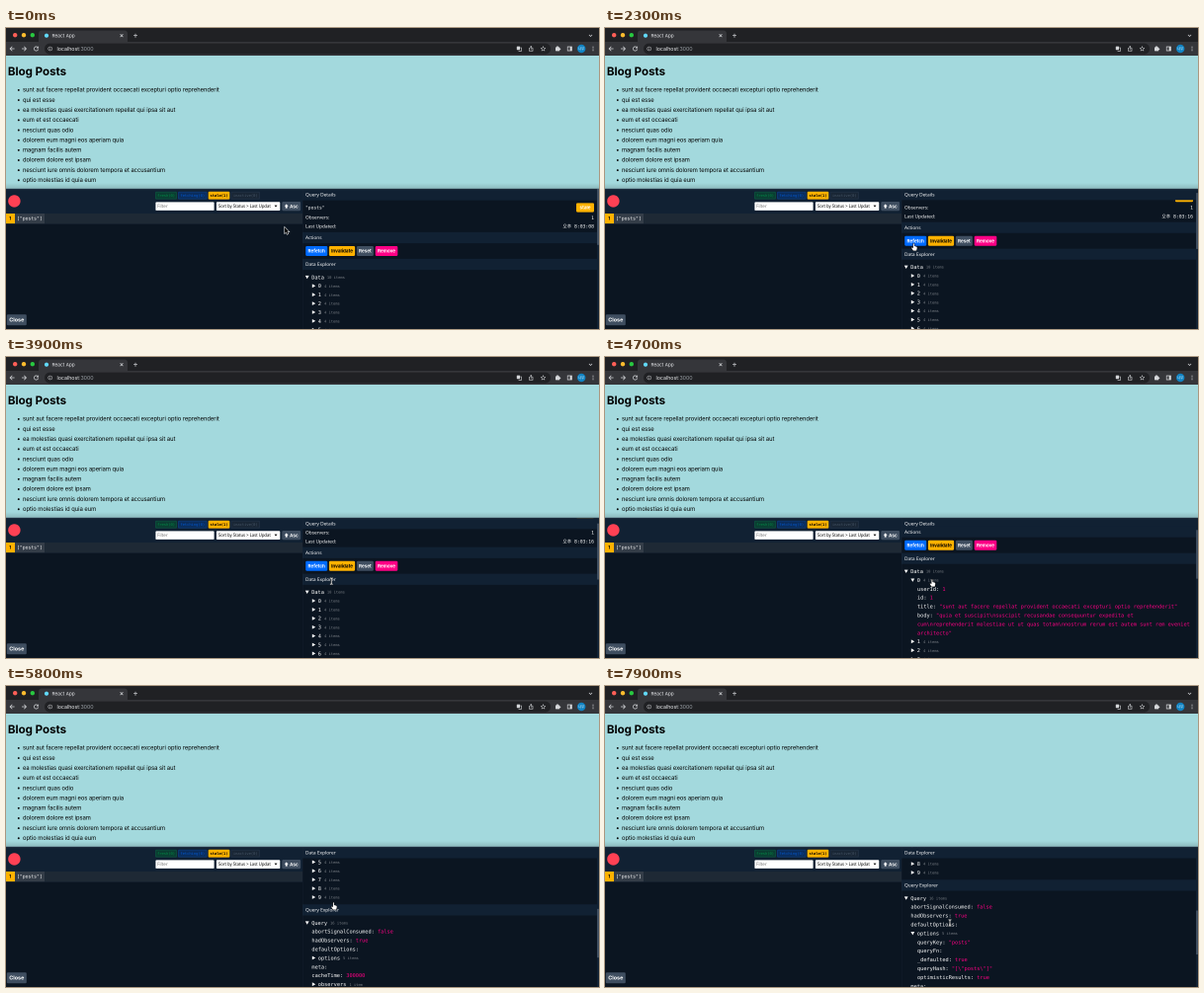
An HTML page with a canvas that plays this animation: 600x305 px, repeating every 8 s.

```html
<!DOCTYPE html>
<html lang="en">
<head>
<meta charset="utf-8">
<title>Blog Posts</title>
<style>
  html, body { margin: 0; width: 100%; height: 100%; overflow: hidden; background: #0b1521; }
  canvas { display: block; width: 600px; height: 305px; }
</style>
</head>
<body>
<canvas id="stage"></canvas>
<script>
const W = 600, H = 305, LOOP = 8000;
const TOP = 163, ROW = 8.9;
const UI = 'Inter, sans-serif';
const SANS = '"Noto Sans", sans-serif';
const MONO = '"DejaVu Sans Mono", "Noto Sans CJK KR", "Noto Sans CJK", monospace';
const C = {
  page: '#a3d9dd', strip: '#202124', bar: '#35363a', icon: '#d5d7da',
  bg: '#0b1521', alt: '#112133', line: '#222e3e', gray: '#3f4e60',
  green: '#00ab52', blue: '#006bff', amber: '#ffb200', pink: '#ff0085'
};

// drawn at double size so that small type keeps its exact place
const canvas = document.getElementById('stage');
const ctx = canvas.getContext('2d');
const ratio = 2 * (window.devicePixelRatio || 1);
canvas.width = W * ratio;
canvas.height = H * ratio;

// ---- drawing helpers ----
function rect(x, y, w, h, color, r = 0) {
  ctx.fillStyle = color;
  ctx.beginPath();
  ctx.roundRect(x, y, w, h, r);
  ctx.fill();
}

function dot(x, y, r, color) {
  ctx.fillStyle = color;
  ctx.beginPath();
  ctx.arc(x, y, r, 0, Math.PI * 2);
  ctx.fill();
}

// y is the middle of the capitals; returns the x where the text ends
function text(s, x, y, size, { font = UI, color = '#fff', weight = 400, align = 'left' } = {}) {
  ctx.font = `${weight} ${size}px ${font}`;
  ctx.fillStyle = color;
  ctx.textAlign = align;
  ctx.fillText(s, x, y + size * 0.36);
  return x + ctx.measureText(s).width;
}

function path(d, { fill, stroke, width = 0.7, x = 0, y = 0 }) {
  ctx.save();
  ctx.translate(x, y);
  const p = new Path2D(d);
  if (stroke) {
    ctx.strokeStyle = stroke;
    ctx.lineWidth = width;
    ctx.stroke(p);
  }
  if (fill) {
    ctx.fillStyle = fill;
    ctx.fill(p);
  }
  ctx.restore();
}

function button(label, x, y, w, h, color, ink = '#fff', size = 4.6) {
  rect(x, y, w, h, color, 1.2);
  text(label, x + w / 2, y + h / 2, size, { color: ink, weight: 700, align: 'center' });
}

// ---- timing ----
function track(keys, t, i = 1) {
  if (t <= keys[0][0]) return keys[0][i];
  for (let k = 1; k < keys.length; k++) {
    const a = keys[k - 1], b = keys[k];
    if (t < b[0]) {
      const u = (t - a[0]) / (b[0] - a[0]);
      return a[i] + (b[i] - a[i]) * u * u * (3 - 2 * u);
    }
  }
  return keys[keys.length - 1][i];
}

const scrollKeys = [
  [900, 0], [1300, 10.3], [3800, 10.3], [4200, 35.3], [4850, 35.3],
  [5600, 180.8], [6000, 180.8], [6500, 203.8], [7000, 203.8], [7400, 205.8]
];
const pointerKeys = [
  [100, 282, 202], [1000, 314, 212], [1500, 313, 222], [2600, 313, 222],
  [2800, 328, 226], [3700, 328, 226], [4200, 331.5, 229], [4900, 331.5, 229],
  [5600, 332, 223], [6200, 332, 223], [6700, 322.5, 233], [6950, 322.5, 233],
  [7250, 322, 250], [7400, 322, 250], [7800, 349, 240]
];
const pointerKinds = [[0, arrow], [1000, hand], [2700, beam], [4000, hand], [7550, beam]];
const OPEN_ITEM = 4400, OPEN_OPTIONS = 7320, REFETCHED = 1800;

// ---- browser and page ----
const posts = [
  'sunt aut facere repellat provident occaecati excepturi optio reprehenderit',
  'qui est esse',
  'ea molestias quasi exercitationem repellat qui ipsa sit aut',
  'eum et est occaecati',
  'nesciunt quas odio',
  'dolorem eum magni eos aperiam quia',
  'magnam facilis autem',
  'dolorem dolore est ipsam',
  'nesciunt iure omnis dolorem tempora et accusantium',
  'optio molestias id quia eum'
];

function drawBrowser() {
  rect(0, 0, W, 14, C.strip);
  ['#ff5f57', '#febc2e', '#28c840'].forEach((c, i) => dot(9.2 + i * 8.8, 7.2, 2.2, c));
  rect(33, 2.5, 90, 14, C.bar, 3);
  rect(0, 14, W, 14, C.bar);
  dot(41, 7.7, 2.1, '#61dafb');
  text('React App', 46.5, 7.8, 4.75, { color: '#e8eaed' });

  const line = (d, x, y, width = 0.7) => path(d, { stroke: C.icon, x, y, width });
  line('M-1.4 -1.4L1.4 1.4M1.4 -1.4L-1.4 1.4', 117, 7.7);
  line('M-2 0H2M0 -2V2', 131, 7.7);
  line('M-1.6 -0.8L0 0.8L1.6 -0.8', 591.5, 7.7);
  line('M2.3 0H-2.2M0 -2.2L-2.2 0L0 2.2', 6.3, 21);
  line('M-2.3 0H2.2M0 -2.2L2.2 0L0 2.2', 18.3, 21);
  line('M1.6 -1.4A2.1 2.1 0 1 0 2.1 0.4M2.2 -2.4V-0.8H0.5', 30.5, 21);

  rect(39, 15.6, 512, 10.9, C.strip, 5.4);
  line('M2 0A2 2 0 1 1 -2 0A2 2 0 1 1 2 0M0 -0.3V1.1M0 -1.1V-0.7', 44.7, 21, 0.5);
  const end = text('localhost', 51.5, 21, 5.25, { color: '#eceef0' });
  text(':3000', end, 21, 5.25, { color: '#9aa0a6' });

  rect(516.8, 18.6, 3.2, 3.6, C.icon, 0.5);
  line('M0.6 -1H2.5V2.3H-0.4', 519, 21, 0.6);
  line('M-1 -0.6H-1.8V2.2H1.8V-0.6H1M0 0.8V-2.6M-1 -1.6L0 -2.6L1 -1.6', 531.2, 21, 0.6);
  line('M0 -2.4L0.7 -0.7L2.4 -0.6L1.1 0.5L1.5 2.2L0 1.2L-1.5 2.2L-1.1 0.5L-2.4 -0.6L-0.7 -0.7Z', 543.5, 21, 0.5);
  rect(556, 19.4, 4.2, 4, C.icon, 0.6);
  dot(558, 19.2, 0.9, C.icon);
  dot(560.4, 21.4, 0.9, C.icon);
  line('M-2.1 -2H2.1V2H-2.1Z', 570.3, 21, 0.7);
  rect(570.6, 19, 2, 4, C.icon);
  dot(582.2, 21, 4.2, '#1184c4');
  text('나무', 582.2, 21, 3.2, { font: '"Noto Sans CJK KR", "Noto Sans CJK", sans-serif', align: 'center' });
  for (let i = -1; i < 2; i++) dot(594, 21 + i * 1.8, 0.55, C.icon);
}

function drawPage() {
  rect(0, 28, W, TOP - 28, C.page);
  text('Blog Posts', 1.9, 44, 11.5, { color: '#000', weight: 700 });
  posts.forEach((s, i) => {
    const y = 62.6 + i * 10.15;
    dot(12.8, y + 0.3, 0.95, '#000');
    text(s, 17, y, 5.76, { color: '#000' });
  });
  const shade = ctx.createLinearGradient(0, 157, 0, TOP);
  shade.addColorStop(0, 'rgba(0,0,0,0)');
  shade.addColorStop(1, 'rgba(0,0,0,.15)');
  rect(0, 157, W, 6, shade);
}

// ---- query list ----
function badge(label, x, w, color, on, ink = color) {
  ctx.globalAlpha = on ? 1 : 0.3;
  rect(x, 165.8, w, 7.8, color, 1);
  if (!on) rect(x + 1, 166.8, w - 2, 5.8, 'rgba(0,0,0,.6)', 1);
  ctx.globalAlpha = on ? 1 : 0.7;
  text(label, x + w / 2, 169.7, 3.75, {
    font: MONO, weight: on ? 700 : 400, color: ink, align: 'center'
  });
  ctx.globalAlpha = 1;
}

function drawList() {
  rect(0, TOP, 300, H - TOP, C.bg);
  rect(0, TOP, 300, 25, C.alt);
  dot(8.4, 175.4, 6.2, '#ff4154');

  badge('fresh(0)', 151, 22, C.green, false);
  badge('fetching(0)', 174, 29.5, C.blue, false);
  badge('stale(1)', 204.7, 21.6, C.amber, true, '#000');
  badge('inactive(0)', 227.5, 29.5, C.gray, false, '#5d6c7e');

  rect(151.4, 176.4, 59.2, 8.5, '#fff', 0.8);
  text('Filter', 153, 180.6, 4.5, { font: SANS, color: '#777' });
  rect(212.9, 176.3, 64.4, 8.7, '#fff', 0.8);
  text('Sort by Status > Last Updat', 214.9, 180.4, 4.2, { font: SANS, color: '#000' });
  path('M-1.4 -0.9H1.4L0 1.1Z', { fill: '#000', x: 273, y: 180.5 });
  rect(279.3, 176, 18.8, 9.2, C.gray, 1.2);
  path('M0 -2.2L2 0H0.9V2H-0.9V0H-2Z', { fill: '#fff', x: 283.7, y: 180.6 });
  text('Asc', 287, 180.6, 4.6, { weight: 700 });

  rect(0, 188, 300, 10.2, '#1e2935');
  rect(9, 188, 30, 10.2, '#343d48');
  rect(0, 188, 9, 10.2, C.amber);
  text('1', 4.3, 193, 4.6, { color: '#000', weight: 700, align: 'center' });
  text('["posts"]', 11, 192.8, 4.75, { font: MONO });
  rect(0, 198.2, 300, 0.4, C.line);
  button('Close', 0.8, 290.3, 20, 11, C.gray, '#fff', 5.4);
}

// ---- query details ----
const mono = { font: MONO };
const pinkMono = { font: MONO, color: C.pink };

function node(label, count, x, y, open) {
  path(open ? 'M-1.9 -1.5H1.9L0 1.9Z' : 'M-1.5 -1.9V1.9L1.9 0Z', { fill: '#fff', x: x + 1.9, y });
  const end = text(label, x + 6.4, y, 5.27, mono);
  text(count, end + 3, y + 0.2, 3.75, { font: MONO, color: 'rgba(255,255,255,.45)' });
}

function field(key, value, x, y) {
  const end = text(key + ': ', x, y, 5.27, mono);
  text(value, end, y, 5.27, pinkMono);
}

function drawData(y, open) {
  node('Data', '10 items', 302.8, y, true);
  for (let i = 0; i < 10; i++) {
    y += ROW;
    node(String(i), '4 items', 309.4, y, open && i === 0);
    if (!open || i) continue;
    field('userId', '1', 316, y += ROW);
    field('id', '1', 316, y += ROW);
    field('title', `"${posts[0]}"`, 316, y += ROW);
    field('body', '"quia et suscipit\\nsuscipit recusandae consequuntur expedita et', 316, y += ROW);
    for (const s of [
      'cum\\nreprehenderit molestiae ut ut quas totam\\nnostrum rerum est autem sunt rem eveniet',
      'architecto"'
    ]) text(s, 316, y += ROW, 5.27, pinkMono);
  }
  return y;
}

function drawQuery(y, open) {
  const add = (key, value) => field(key, value, 309.4, y += ROW);
  const group = (key, count, isOpen) => node(key, count, 309.4, y += ROW, isOpen);
  node('Query', '16 items', 302.8, y, true);
  add('abortSignalConsumed', 'false');
  add('hadObservers', 'true');
  add('defaultOptions', '');
  group('options', '5 items', open);
  if (open) {
    const sub = (key, value) => field(key, value, 316, y += ROW);
    sub('queryKey', '"posts"');
    sub('queryFn', '');
    sub('_defaulted', 'true');
    sub('queryHash', '"[\\"posts\\"]"');
    sub('optimisticResults', 'true');
  }
  add('meta', '');
  add('cacheTime', '300000');
  group('observers', '1 item');
  group('cache', '4 items');
  add('queryKey', '"posts"');
  add('queryHash', '"[\\"posts\\"]"');
}

function drawDetails(t) {
  const s = track(scrollKeys, t);
  const itemOpen = t >= OPEN_ITEM, optionsOpen = t >= OPEN_OPTIONS;
  const label = { font: SANS };
  const right = { font: MONO, align: 'right' };

  ctx.save();
  ctx.beginPath();
  ctx.rect(300, TOP, 300, H - TOP);
  ctx.clip();
  rect(300, TOP, 300, H - TOP, C.bg);

  text('"posts"', 303, 181.8 - s, 4.65, mono);
  button('stale', 577, 177.4 - s, 18, 9.2, C.amber);
  text('Observers:', 303, 192 - s, 4.8, label);
  text('1', 595, 192.2 - s, 4.75, right);
  text('Last Updated:', 303, 201 - s, 4.8, label);
  text(t < REFETCHED ? '오후 8:03:08' : '오후 8:03:16', 595, 201 - s, 4.75, right);

  const by = 221 - s;
  button('Refetch', 303.2, by, 22, 10, C.blue);
  button('Invalidate', 326.9, by, 26.2, 10, C.amber, '#000');
  button('Reset', 354.9, by, 17, 10, C.gray);
  button('Remove', 373.7, by, 22.6, 10, C.pink);

  const last = drawData(252.4 - s, itemOpen);
  drawQuery(last + 25.9, optionsOpen);

  // section heads stick to the top of the panel
  const heads = [
    ['Query Details', 169 - s], ['Actions', 212.5 - s],
    ['Data Explorer', 239.5 - s], ['Query Explorer', last + 12.9]
  ];
  for (const [name, y] of heads) {
    const hy = Math.max(168.8, y);
    rect(300, hy - 5.6, 298, 11.2, C.alt);
    text(name, 303, hy, 4.8, label);
  }

  const view = H - TOP;
  const total = 355 + (itemOpen ? 6 * ROW : 0) + (optionsOpen ? 5 * ROW : 0);
  rect(598, TOP, 2, view, C.alt);
  rect(598, TOP + s * view / total, 2, view * view / total, C.gray);
  rect(299.7, TOP, 0.5, view, C.line);
  ctx.restore();
}

// ---- pointer ----
function arrow(x, y) {
  path('M0 0V6L1.4 4.8L2.4 7L3.4 6.5L2.4 4.4H4.3Z', { fill: '#000', stroke: '#fff', width: 1, x, y });
}

function hand(x, y) {
  path('M-1.1 -3.4Q-0.6 -4 -0.1 -3.4V-1L2.2 -0.4Q3 0 2.7 1.4L2.1 3.6H-1.1L-2.9 0.9Q-2.6 0 -1.1 1Z',
    { fill: '#fff', stroke: '#000', width: 0.9, x, y });
}

function beam(x, y) {
  const d = 'M-1.4 -3.2Q0 -3.2 0 -2.3Q0 -3.2 1.4 -3.2M0 -2.3V2.3M-1.4 3.2Q0 3.2 0 2.3Q0 3.2 1.4 3.2';
  path(d, { stroke: '#000', width: 1.5, x, y });
  path(d, { stroke: '#fff', width: 0.8, x, y });
}

function drawPointer(t) {
  const kind = pointerKinds.filter(k => t >= k[0]).pop()[1];
  kind(track(pointerKeys, t, 1), track(pointerKeys, t, 2));
}

function draw(t) {
  ctx.setTransform(ratio, 0, 0, ratio, 0, 0);
  drawBrowser();
  drawPage();
  drawList();
  drawDetails(t);
  rect(0, 162.8, W, 0.4, C.gray);
  drawPointer(t);
}

const start = performance.now();
function tick() {
  draw((performance.now() - start) % LOOP);
  requestAnimationFrame(tick);
}
tick();
</script>
</body>
</html>
```
